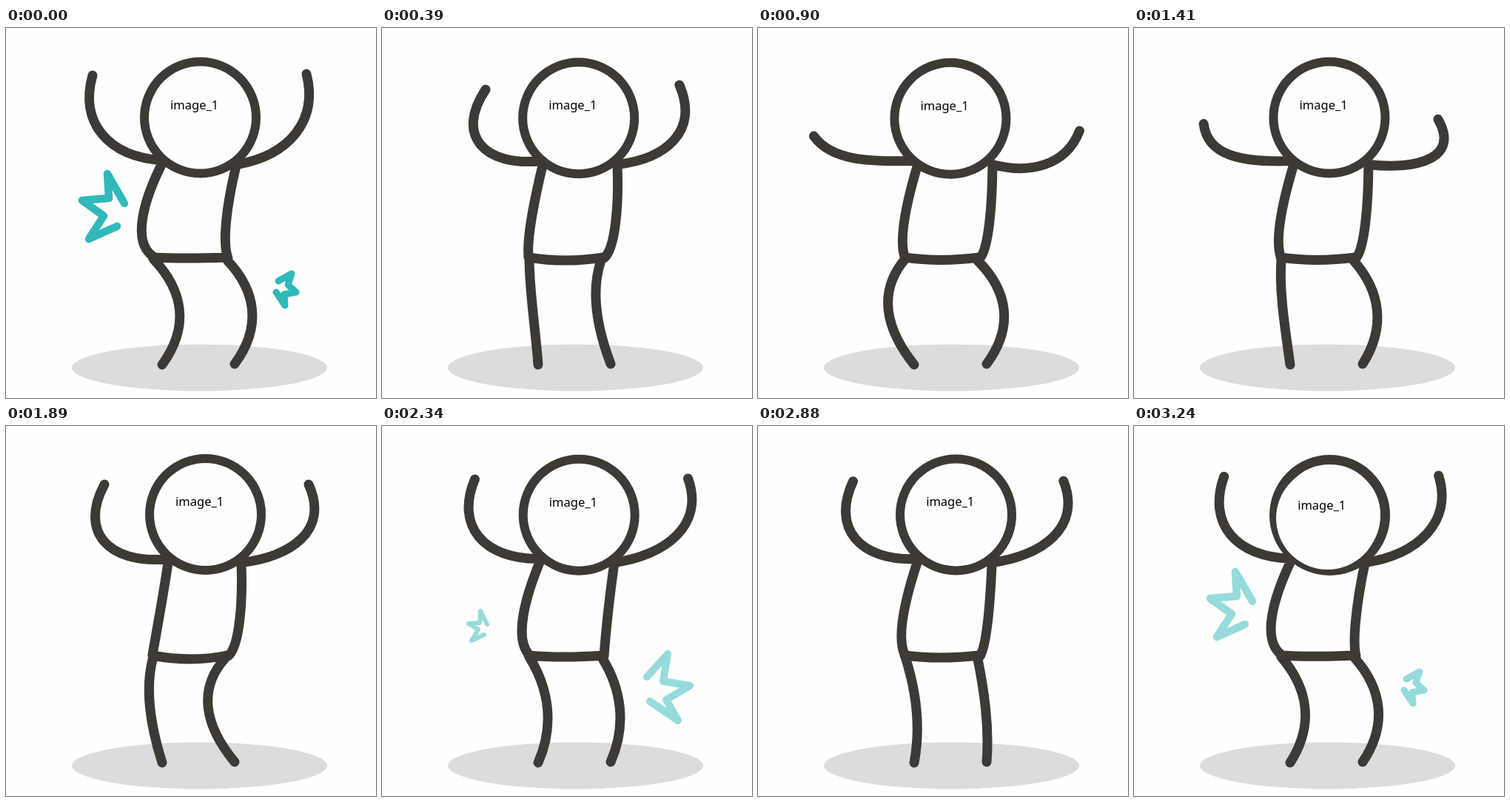
Recreate the animation shown at these times as an HTML page. Size 500 px wide and 500 px high, loop 3270 ms.

```html
<!DOCTYPE html>
<html lang="en">
<head>
<meta charset="utf-8">
<title>Dancing figure</title>
<style>
  html, body { margin: 0; width: 100%; height: 100%; overflow: hidden; background: #fefefe; }
  svg { display: block; width: 100vw; height: 100vh; }
  path { fill: none; stroke-linecap: round; stroke-linejoin: round; }
  #limbs { stroke: #3d3a36; stroke-width: 13; }
  .spark { stroke: #31b9b9; }
  text { font: 16.5px "Noto Sans", "Open Sans", sans-serif; fill: #000; }
</style>
</head>
<body>
<svg viewBox="0 0 500 500">
  <ellipse cx="261.5" cy="459" rx="172.5" ry="31.5" fill="#dcdcdc"/>
  <g id="sparkA" class="spark">
    <path stroke-width="10.5" d="M160 237L137 197L139 230L103 233L132 254L112 285L150 268"/>
    <path stroke-width="9" d="M368 342L386 332L381 347L392 357L376 360L377 375L365 357"/>
  </g>
  <g id="sparkB" class="spark">
    <path stroke-width="6" d="M142 268L133 250L132 266L117 267L130 275L121 290L138 282"/>
    <path stroke-width="10" d="M358 339L386 308L380 345L416 351L384 370L400 398L362 372"/>
  </g>
  <path id="limbs"/>
  <g id="head">
    <circle r="75" fill="#fefefe" stroke="#3d3a36" stroke-width="13"/>
    <g id="face">
      <circle r="69.5" fill="#fefefe"/>
      <text x="-40.4" y="-11.5">image_1</text>
    </g>
  </g>
</svg>
<script>
const LOOP = 3270, STEP = 30, { PI, min, max, abs, sin, cos, sqrt } = Math;
const $ = id => document.getElementById(id);

// The tempo drifts a little: time and beats counted so far
const tempo = [[0, 0], [1890, 6.5], [2400, 8], [2950, 10], [LOOP, 11]];

const mix = (a, b, k) => a + (b - a) * k;
const above = (v, limit) => max(0, v - limit);
const clamp = v => min(1, max(0, v));
const smooth = v => (v = clamp(v), v * v * (3 - 2 * v));
const wave = turns => (1 - cos(2 * PI * turns)) / 2;
const bell = (t, peak, width) => smooth(1 - abs(t - peak) / width);

function beats(t) {
  const i = tempo.findIndex(([end]) => end > t);
  const [t0, b0] = tempo[i - 1], [t1, b1] = tempo[i];
  return mix(b0, b1, (t - t0) / (t1 - t0));
}

const curve = (x, y, ...rest) => `M${x} ${y}C${rest.join(" ")}`;
const blend = (from, to, k) => curve(...from.map((v, i) => mix(v, to[i], k)));

function leftArm(x, y, sway) {
  return curve(mix(212, 216, sway), mix(179, 180, sway),
    137 + above(100, x) * .5, min(187, 174 + .8 * (y - 64)) - .1 * above(y, 85),
    x - 18 - (x - 117), y + 63 - .45 * above(y, 80), x, y);
}

function rightArm(x, y, sway) {
  const out = above(x, 415);
  return curve(mix(312, 318, sway), 184.5,
    383 - .9 * out, 172 + .33 * (y - 62),
    x + min(30, 16 + .75 * (y - 62)) - 2.5 * out, y + 63 - .25 * above(y, 80), x, y);
}

const leg = (hipX, hipY, knee, foot, footY) =>
  curve(hipX, hipY, knee - 4, 355, knee + 4, 404, foot, footY);

function torso(l, r) {
  return blend([212, 181, 186, 232, 170, 288, 198, 308], [219, 185, 212, 232, 203, 280, 198, 309], l)
    + blend([311, 186, 298, 240, 292, 290, 300, 311], [318, 187, 320, 235, 316, 298, 300, 311], r)
    + `M198 310Q${mix(240, 250, l)} ${mix(312, 320, l)} 299 310`;
}

// Opacity changes by half a unit per step around a peak
const flash = (t, peak) => clamp(1 - above(abs(t - peak), STEP) / (2 * STEP));

function draw(t) {
  const beat = beats(t);
  const sway = wave(beat);
  const swing = sqrt(sway);
  // The middle part: hands circle once per two beats, knees open on every beat
  const groove = smooth((t - 480) / 240) * smooth((1830 - t) / 330);
  const open = groove * wave(beat - 2.6);
  const turn = PI * (beat - 2.6);
  const tuck = bell(t, 390, 180);
  const reach = bell(t, 3060, 150);

  const lean = mix(sway, .6, groove), leanR = min(1, lean * 1.4);
  const kneeL = mix(mix(244, 191, sway), 166.5, open);
  const kneeR = mix(mix(342, 263.5, sway ** 1.3), 342, open);

  const lx = mix(117 + 16 * swing + 9 * tuck - 48 * reach, 75 + 27 * cos(turn), groove);
  const ly = mix(64 + 15 * swing + 6 * tuck + 28 * reach, 90 + 56 * sin(turn), groove);
  const rx = mix(406 + 3 * swing + 6 * sin(PI * swing) - 9 * tuck, 435 - 34 * cos(turn), groove);
  const ry = mix(62 + 17 * swing, 86 + 53 * sin(turn), groove);

  $("limbs").setAttribute("d",
    leg(199, 312, kneeL, 211, 455) + leg(mix(299, 296, leanR), 314, kneeR, 309, 454)
    + torso(lean, leanR) + leftArm(lx, ly, lean) + rightArm(rx, ry, leanR));

  const bob = sqrt(lean);
  const hx = 262.5 + 7 * bob - 8 * open - 3 * tuck;
  const hy = 121 - 1.5 * bob + 2.5 * open + 2 * tuck;
  $("head").setAttribute("transform", `translate(${hx} ${hy})`);
  const slip = above(t, 3180) / 60;
  $("face").setAttribute("transform", `translate(${-3 * slip} ${4 * slip})`);

  const late = t > LOOP / 2 ? t - LOOP : t;
  $("sparkA").setAttribute("opacity", flash(late, 30));
  $("sparkB").setAttribute("opacity", flash(t, 2400));
}

const start = performance.now();
function tick() {
  const t = (performance.now() - start) % LOOP;
  draw(Math.floor(t / STEP) * STEP);
  requestAnimationFrame(tick);
}
tick();
</script>
</body>
</html>
```
